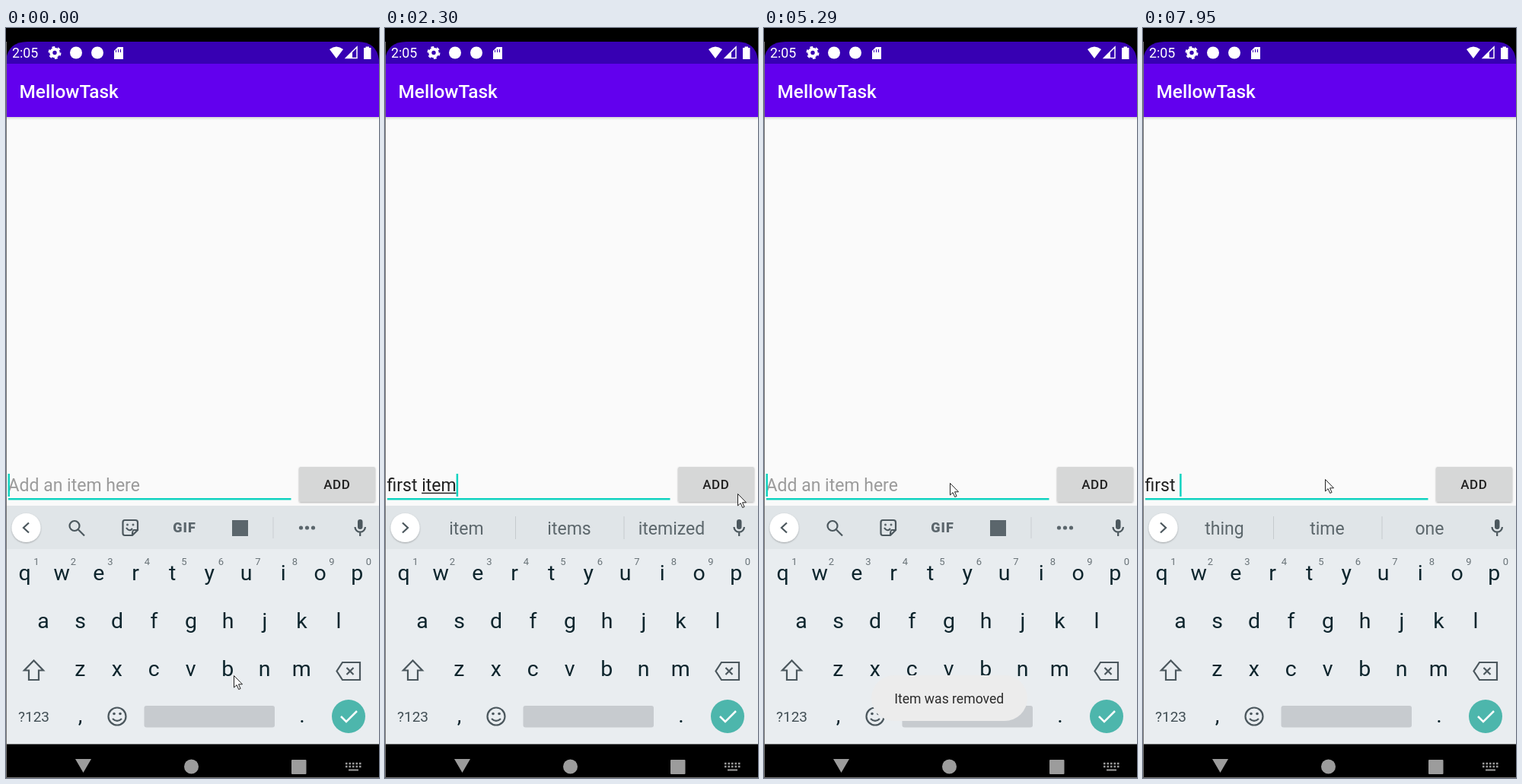
These frames come from a looping animation (490x986 px, 8000 ms). An HTML page:

```html
<!DOCTYPE html>
<html lang="en">
<head>
<meta charset="utf-8">
<title>Todo list</title>
<style>
  html, body { margin: 0; width: 100%; height: 100%; overflow: hidden; background: #000; }
  svg { display: block; width: 100%; height: 100%; }
  text { font-family: Roboto, "Noto Sans", sans-serif; white-space: pre; }
  .mid { text-anchor: middle; }
  .key { font-size: 28.5px; fill: #0d252d; }
  .digit { font-size: 13px; fill: #697378; }
  .field { font-size: 23px; }
  .word { font-size: 23px; fill: #5c676c; }
  .line { fill: none; stroke: #4b575d; stroke-width: 2.2; }
</style>
</head>
<body>
<svg viewBox="0 0 490 986" preserveAspectRatio="none">
  <defs>
    <linearGradient id="shade" x2="0" y2="1">
      <stop stop-color="#000" stop-opacity=".15"/>
      <stop offset="1" stop-color="#000" stop-opacity="0"/>
    </linearGradient>
    <filter id="soft" x="-30%" y="-30%" width="160%" height="160%">
      <feDropShadow dx="0" dy="1" stdDeviation="1.2" flood-opacity=".3"/>
    </filter>
  </defs>

  <rect width="490" height="986"/>
  <rect y="47" width="490" height="582" fill="#fafafa"/>
  <path d="M0 47V42Q3 18 28 18H462Q487 18 490 42V47Z" fill="#3700b3"/>
  <rect y="47" width="490" height="70" fill="#6200ee"/>
  <rect y="117" width="490" height="4" fill="url(#shade)"/>

  <g fill="#fff">
    <text x="8" y="39" font-size="17.8">2:05</text>
    <circle cx="64" cy="32.5" r="4.7" fill="none" stroke="#fff" stroke-width="4"/>
    <circle cx="64" cy="32.5" r="7.4" fill="none" stroke="#fff" stroke-width="2.2" stroke-dasharray="3.9 3.85"/>
    <circle cx="92" cy="32.5" r="8"/>
    <circle cx="120" cy="32.5" r="8"/>
    <path d="M147 25H154V41H142V30Z"/>
    <path d="M144.5 29v3m3-4v4m3-4v4" stroke="#3700b3"/>
    <path d="M425 28Q434 21 443 28L434 40Z"/>
    <path d="M461 25V39.5H446.5Z" fill="none" stroke="#fff" stroke-width="1.5"/>
    <path d="M455 31V39H447Z"/>
    <path d="M472.500 24.500H477V26H479.500V41H470V26H472.500Z"/>
    <text x="17.500" y="92" font-size="24.400" font-weight="500">MellowTask</text>
  </g>

  <text id="item" x="17.500" y="155" font-size="19.600" fill="#303030">first item</text>
  <text id="hint" class="field" x="2.500" y="609" fill="#9b9b9b">Add an item here</text>
  <text id="entry" class="field" x="2.500" y="609" fill="#212121"></text>
  <path id="under" stroke="#212121" stroke-width="1.4"/>
  <rect x="3" y="618" width="371.500" height="2.500" fill="#10d3c0"/>
  <rect id="caret" y="586" width="2.500" height="30" fill="#10d3c0"/>

  <rect id="button" x="385" y="577" width="100" height="46" rx="2" fill="#d6d7d7" filter="url(#soft)"/>
  <text class="mid" x="434.800" y="606" font-size="17" font-weight="500" letter-spacing=".5" fill="#212121">ADD</text>

  <rect y="628" width="490" height="313.500" fill="#e9edf0"/>
  <rect y="628" width="490" height="57" fill="#e0e5e8"/>
  <circle cx="26.500" cy="657" r="19" fill="#fff" filter="url(#soft)"/>
  <path id="chevron" class="line"/>
  <rect x="462" y="646" width="6.500" height="13" rx="3.200" fill="#4b575d"/>
  <path class="line" d="M458.500 656a6.700 6.700 0 0 0 13.400 0M465.200 663v5"/>

  <g id="tools" fill="#5b666c">
    <circle class="line" cx="90" cy="654.500" r="6.500"/>
    <path class="line" d="M95 659.500L103 667.500"/>
    <path class="line" d="M156 647H170Q173 647 173 650V660L166 667H156Q153.500 667 153.500 664V650Q153.500 647 156 647ZM173 660H168Q166 660 166 667M158 657q4 6 8 1"/>
    <circle cx="159.500" cy="653" r="1.500"/><circle cx="167" cy="653" r="1.500"/>
    <text class="mid" x="234.500" y="663" font-size="18" font-weight="900" letter-spacing="1">GIF</text>
    <rect x="297" y="647" width="21" height="21"/>
    <path d="M351 643V671" stroke="#c9ced2"/>
    <circle cx="387.500" cy="657" r="2.600"/><circle cx="395.500" cy="657" r="2.600"/><circle cx="403.500" cy="657" r="2.600"/>
  </g>
  <g id="words">
    <path d="M171.500 642V672M314 642V672" stroke="#c5cacd"/>
  </g>

  <g id="keys"></g>
  <path class="line" d="M36.500 831.500L49 844.500H43V857H30V844.500H24Z"/>
  <path class="line" d="M442 834H465V857H442L434.500 845.500ZM447.500 841l9 9m0-9l-9 9"/>
  <text class="mid" x="36.500" y="912" font-size="19" fill="#414e54">?123</text>
  <text class="key mid" x="97.500" y="913" font-size="24">,</text>
  <text class="key mid" x="389" y="913" font-size="24">.</text>
  <circle class="line" cx="146" cy="905" r="11.500"/>
  <path class="line" d="M140 908q6 6 12 0"/>
  <circle cx="142" cy="901.500" r="1.800" fill="#4b575d"/><circle cx="150" cy="901.500" r="1.800" fill="#4b575d"/>
  <rect x="181.500" y="891" width="171.500" height="28.500" rx="3" fill="#c7cbcf"/>
  <circle cx="450" cy="905" r="22" fill="#4db6ac"/>
  <path d="M440 905L447 912L461 898" fill="none" stroke="#fff" stroke-width="2.500"/>

  <g fill="#9c9c9c">
    <path d="M91 961H112L101.500 979Z"/>
    <circle cx="243.500" cy="971" r="9.500"/>
    <rect x="375" y="962" width="19.500" height="19" rx="1"/>
    <path d="M446 967H467M446 971H467" stroke="#9c9c9c" stroke-width="2.500" stroke-dasharray="2.500 2"/>
    <path d="M450 975.500H463" stroke="#9c9c9c" stroke-width="2"/>
  </g>

  <g id="toast">
    <rect id="bubble" y="851" height="60" rx="30" fill="#ececec"/>
    <text id="message" class="mid" x="243.200" y="887.500" font-size="17.600" fill="#2b2b2b"></text>
  </g>
  <path d="M.5 18V985.500H490" fill="none" stroke="#777"/>
  <path id="mouse" d="M0 0V15.500L3.600 12.200L6.200 18L8.600 17L6 11.300H11Z" fill="#fff" stroke="#222"/>
</svg>

<script>
const LOOP = 8000;
const $ = id => document.getElementById(id);

function addText(parent, className, x, y, value = '') {
  const node = document.createElementNS('http://www.w3.org/2000/svg', 'text');
  node.setAttribute('class', className);
  node.setAttribute('x', x);
  node.setAttribute('y', y);
  node.textContent = value;
  parent.append(node);
  return node;
}

const rows = [['qwertyuiop', 24.7, 726], ['asdfghjkl', 49, 789], ['zxcvbnm', 97.2, 852]];
rows.forEach(([letters, left, y], row) => [...letters].forEach((letter, i) => {
  const x = left + i * 48.5;
  addText($('keys'), 'key mid', x, y, letter);
  if (row === 0) addText($('keys'), 'digit mid', x + 15.3, 706, (i + 1) % 10);
}));
const words = [107, 242, 376.5].map(x => addText($('words'), 'word mid', x, 666));

// Each track lists [start time, value]; a value holds until the next one.
const typing = [
  [0, ''], [120, 'f'], [270, 'fir'], [420, 'firs'], [540, 'first'], [820, 'first '],
  [940, 'first i'], [1060, 'first it'], [1180, 'first item'], [2700, ''],
  [6390, 'f'], [6540, 'fi'], [6810, 'fir'], [6930, 'firs'], [7050, 'first'], [7320, 'first ']
];
const suggestions = {
  'f': 'for from first', 'fi': 'first find fire', 'fir': 'first fire firm',
  'firs': 'first firsts firsthand', 'first': 'first firsts firsthand',
  'first ': 'thing time one', 'first i': 'in is it', 'first it': 'it item its',
  'first item': 'item items itemized'
};
const caretTrack = [
  [0, 1], [1640, 0], [2150, 1], [3600, 0], [4060, 1], [4490, 0],
  [5000, 1], [5410, 0], [5560, 1], [5990, 0], [6390, 1]
];
const mouseTrack = [
  [0, [299, 851]], [1640, [309, 825]], [1760, [344, 718]], [1910, [395, 590]],
  [2030, [440, 552]], [2150, [454, 622]], [2300, [463, 612]], [2580, [463, 615]],
  [3200, [400, 530]], [3320, [331, 319]], [3450, [91, 167]], [3600, [91, 150]],
  [4880, [170, 400]], [5000, [262, 613]], [5170, [252, 606]], [5290, [244, 598]],
  [5410, [240, 594]], [5560, [239, 590]], [5710, [239, 593]]
];
const toastTrack = [
  [0, 0], [2700, .3], [2820, .68], [2940, .92], [3060, 1], [4610, .5], [4730, 0],
  [4880, .5], [5000, 1], [6540, .8], [6660, .35], [6810, 0]
];
const at = (track, t) => track.findLast(([start]) => start <= t)[1];
const within = (t, from, to) => t >= from && t < to;
const show = (id, visible) => $(id).setAttribute('visibility', visible ? 'visible' : 'hidden');

function draw(t) {
  const text = at(typing, t);
  const suggesting = text !== '' && !within(t, 6390, 6540);
  const entry = $('entry');
  entry.textContent = text;
  const end = 2.5 + (text ? entry.getComputedTextLength() : 0);

  // The word being composed is underlined.
  const wordStart = text.lastIndexOf(' ') + 1;
  const composing = wordStart < text.length;
  const left = composing ? entry.getStartPositionOfChar(wordStart).x : 0;
  $('under').setAttribute('d', composing ? `M${left} 611.5H${end}` : '');
  $('caret').setAttribute('x', end);
  show('caret', at(caretTrack, t));
  show('hint', !text);
  show('item', within(t, 2700, 4490));

  show('tools', !suggesting);
  show('words', suggesting);
  $('chevron').setAttribute('d', suggesting ? 'M23 650.5L30 657L23 663.5' : 'M30 650.5L23 657L30 663.5');
  const choices = suggesting ? suggestions[text].split(' ') : [];
  words.forEach((word, i) => word.textContent = choices[i] || '');

  const removed = t >= 4880;
  const width = removed ? 205 : 184;
  $('message').textContent = removed ? 'Item was removed' : 'Item was added';
  $('bubble').setAttribute('x', 243.5 - width / 2);
  $('bubble').setAttribute('width', width);
  $('toast').setAttribute('opacity', at(toastTrack, t));

  $('button').setAttribute('fill', within(t, 2580, 2700) ? '#c6c7c7' : '#d6d7d7');
  const [x, y] = at(mouseTrack, t);
  $('mouse').setAttribute('transform', `translate(${x + .5} ${y + .5})`);
}

const start = performance.now();
function tick() {
  draw((performance.now() - start) % LOOP);
  requestAnimationFrame(tick);
}
tick();
</script>
</body>
</html>
```
